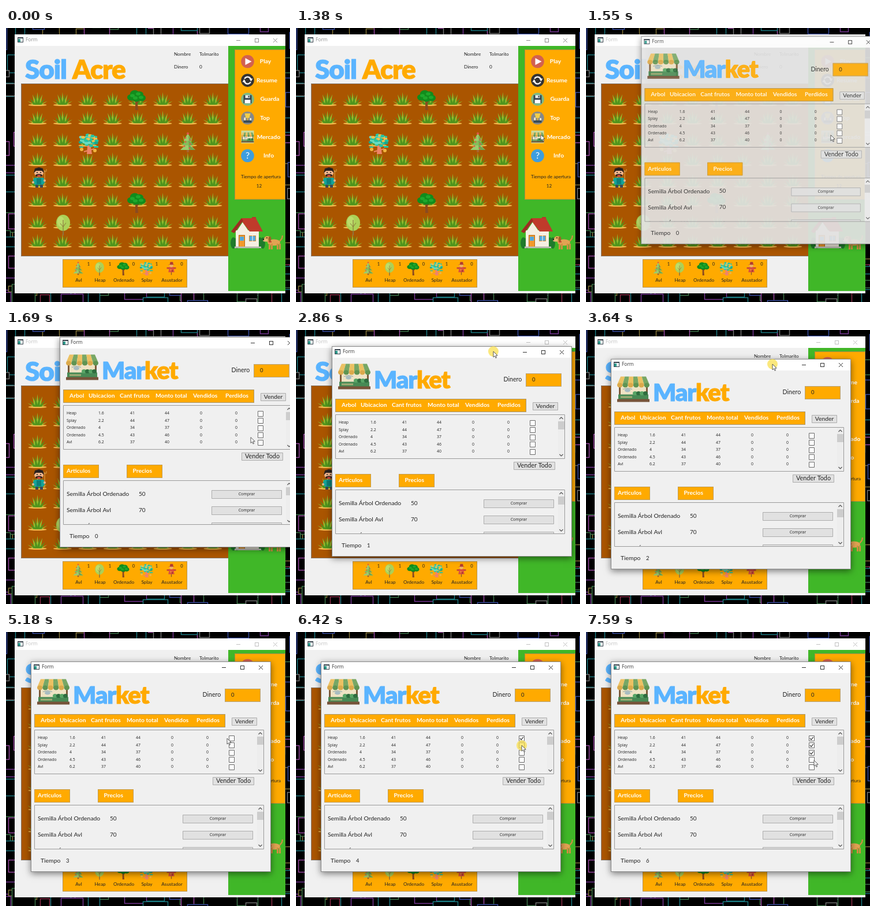
Write an HTML page with a canvas that moves like this. It is 492 by 474 pixels and loops after 8 s.

```html
<!DOCTYPE html>
<html lang="es">
<head>
<meta charset="utf-8">
<title>Form</title>
<style>
html, body { margin: 0; width: 100%; height: 100%; overflow: hidden; background: #000; }
canvas { display: block; width: 492px; height: 474px; }
</style>
</head>
<body>
<canvas id="stage"></canvas>
<script>
const W = 492, H = 474, LOOP = 8000;
const ORANGE = '#ffaa00', BLUE = '#5ab4ff', GRAY = '#f0f0f0';
const HAND = 'Lato, sans-serif', UI = '"Open Sans", sans-serif';
const dpr = window.devicePixelRatio || 1;

function setup(canvas) {
  canvas.width = W * dpr;
  canvas.height = H * dpr;
  const ctx = canvas.getContext('2d');
  ctx.scale(dpr, dpr);
  return ctx;
}
const screenCtx = setup(document.getElementById('stage'));
const desk = document.createElement('canvas');
let c = setup(desk);

// ---- drawing helpers ----
function rect(color, x, y, w, h) { c.fillStyle = color; c.fillRect(x, y, w, h); }
function frame(color, x, y, w, h) {
  c.strokeStyle = color; c.lineWidth = 1;
  c.strokeRect(x + .5, y + .5, w - 1, h - 1);
}
function box(fill, edge, x, y, w, h) { rect(fill, x, y, w, h); frame(edge, x, y, w, h); }
function oval(color, x, y, rx, ry = rx) {
  c.fillStyle = color;
  c.beginPath(); c.ellipse(x, y, rx, ry, 0, 0, 7); c.fill();
}
function path(p) {
  c.beginPath();
  for (let i = 0; i < p.length; i += 2) c.lineTo(p[i], p[i + 1]);
}
function poly(color, ...p) { path(p); c.fillStyle = color; c.fill(); }
function line(color, width, ...p) {
  path(p); c.strokeStyle = color; c.lineWidth = width; c.stroke();
}
function text(s, x, y, size, { font = HAND, color = '#222', weight = 400, align = 'left' } = {}) {
  c.font = `${weight} ${size}px ${font}`;
  c.fillStyle = color; c.textAlign = align; c.textBaseline = 'middle';
  c.fillText(s, x, y);
}
function heading(s, x, y, size, color) {
  c.font = `900 ${size}px ${HAND}`;
  c.letterSpacing = '-1.2px';
  c.textAlign = 'left'; c.textBaseline = 'alphabetic';
  c.fillStyle = c.strokeStyle = color; c.lineWidth = 1; c.lineJoin = 'round';
  c.fillText(s, x, y); c.strokeText(s, x, y);
  const w = c.measureText(s).width;
  c.letterSpacing = '0px';
  return x + w;
}
function at(x, y, scale, draw) {
  c.save(); c.translate(x, y); c.scale(scale, scale); draw(); c.restore();
}
function seeded(seed) {
  return () => (seed = (seed * 16807) % 2147483647) / 2147483647;
}

// ---- pictures, each around its own centre ----
function grass() {
  oval('#f3b94c', 0, 10.3, 16, 1.8);
  for (const k of [-4, 4, -2, 2, 0, -3, 3, -1, 1]) {
    const tipY = -12 + k * k * .95 + (k % 2 ? 2 : 0);
    poly(k % 2 ? '#4f941d' : '#93bd30', k * 1.5 - 2.6, 9.5, k * 4.3, tipY, k * 1.5 + 2.6, 9.5);
  }
}
function pine() {
  rect('#a9642f', -2, 10, 4, 7);
  for (let i = 2; i >= 0; i--) {
    const y = -16 + i * 8, w = 7 + i * 3;
    poly(i % 2 ? '#86bd5c' : '#9dcb6c', 0, y, w, y + 13, -w, y + 13);
    poly('#6fa74e', 1, y + 4, w, y + 13, 2, y + 13);
  }
  for (let i = 0; i < 6; i++) oval('#e0584a', (i % 2 ? 4 : -4) + (i > 3 ? i - 6 : 0), -8 + i * 3.6, 1.4);
  oval('#e0584a', 0, -15.5, 2);
}
function heap() {
  rect('#9a6b3c', -1, -2, 2, 21);
  oval('#acd057', 0, -3, 12, 14);
  oval('#bcdc6c', -4, -5, 6, 9);
  line('#8a7a3c', 1.2, 0, 18, 0, -8);
  line('#8a7a3c', 1, -5, -2, 0, 4, 5, -3);
}
function oak() {
  poly('#8a4b20', -2, 18, -2, 4, -9, -1, 0, 2, 8, -2, 2, 6, 3, 18);
  for (const [x, y, r] of [[-9, -4, 7], [9, -3, 7], [-3, -10, 8], [5, -9, 7], [0, -2, 7]])
    oval('#118c1c', x, y, r, r * .8);
  for (const [x, y] of [[-7, -7], [3, -10], [8, -4], [-2, -3]]) oval('#1fa82c', x, y, 4, 2.8);
}
function splay() {
  poly('#ef8468', -3, 18, -2, 6, -8, 0, 0, 3, 9, -1, 4, 7, 6, 18);
  const rnd = seeded(77), tones = ['#25c3a4', '#25c3a4', '#69dcc0', '#f2c14e', '#1aa78c'];
  for (let i = 0; i < 34; i++) {
    const a = i * 2.4, r = Math.sqrt(rnd());
    oval(tones[i % 5], Math.cos(a) * r * 15, -6 + Math.sin(a) * r * 10, 3.4, 2.4);
  }
  oval('#f2b53d', -12, 10, 3); oval('#f2b53d', 11, 12, 3);
  rect('#25c3a4', -16, 5, 7, 2); rect('#25c3a4', 9, 4, 8, 3);
  line('#ef8468', 2, -8, 14, 10, 9);
}
function farmer() {
  line('#d59b45', 1.2, 10, 16, 10, -13);
  line('#d59b45', 1, 7, -15, 7, -11, 13, -11, 13, -15);
  rect('#3a4a58', -6, 9, 5, 8); rect('#3a4a58', 2, 9, 5, 8);
  oval('#f0b58c', 0, -9, 8, 8);
  poly('#2a211d', -9, -8, -7, -16, 0, -18, 7, -16, 9, -8, 5, -12, -5, -12);
  oval('#2a211d', 0, -4, 6, 2.6); oval('#d8433a', 0, -3.4, 3, 1.5);
  oval('#222', -3, -9, 1); oval('#222', 3, -9, 1);
  poly('#14a39a', -8, 0, 8, 0, 11, 7, 7, 12, -7, 12, -11, 7);
  rect('#0d7f79', -4, 1, 8, 10);
  oval('#f0b58c', -10, 8, 2); oval('#f0b58c', 10, 5, 2);
}
function scarecrow() {
  rect('#8c5a28', -1, 2, 2, 15);
  rect('#c7453a', -12, -3, 24, 4);
  poly('#d9503f', -5, -4, 5, -4, 8, 10, -8, 10);
  oval('#edb765', 0, -8, 5);
  poly('#b23b30', -9, -10, -4, -11, -3, -17, 4, -17, 5, -11, 9, -10);
  rect('#f0a43a', -3, 2, 3, 3); rect('#8f2f28', 1, 5, 3, 3);
}
function stall() {
  rect('#efe3c4', -24, -8, 48, 23);
  rect('#7d5a3a', -25, -6, 3, 24); rect('#7d5a3a', 22, -6, 3, 24);
  line('#8aa5ad', 1.2, -18, 0, -10, -2, -2, 0); oval('#a7bcc2', -10, 2, 5, 3);
  for (let i = 0; i < 6; i++) {
    const x = -28 + i * 9.33, tone = i % 2 ? '#78a765' : '#ecc163';
    poly(tone, -22 + i * 7.33, -22, -14.7 + i * 7.33, -22, x + 9.33, -8, x, -8);
    oval(i % 2 ? '#5f9452' : '#dba94b', x + 4.66, -7, 4.66, 4);
  }
  rect('#478a55', -26, 9, 52, 9);
  for (let i = 0; i < 4; i++) oval(i % 2 ? '#2f6d3f' : '#58a566', 3 + i * 6, 7, 4, 3.5);
  rect('#77543a', -28, 17, 56, 5);
  rect('#a3ad76', -22, 12, 20, 3);
}
function house() {
  for (const [x, w] of [[386 - 392, 0], [-24, 5], [-18, 5], [22, 5], [27, 4]])
    if (w) oval('#1f7a2b', x, 18, w, 10);
  rect('#b8352a', 8, -27, 7, 12);
  rect('#f6efe2', -20, -4, 40, 30);
  poly('#f6efe2', -18, -3, -8, -18, 2, -3);
  poly('#c03a2b', -28, -2, -10, -25, 15, -25, 27, -2, 4, -2, -9, -19, -22, 0);
  poly('#9e2c22', -28, -2, -10, -25, -7, -21, -23, 1);
  box('#f39a2b', '#b86a16', -15, 4, 11, 21);
  box('#53a9dd', '#e28d28', 3, 5, 12, 10);
  rect('#53a9dd', -13, 7, 7, 7);
  line('#fff', 1, 9, 5, 9, 15);
  rect('#b9b9b0', -22, 24, 46, 3);
}
function dog() {
  oval('#e2a353', 1, 1, 11, 5.5);
  for (const x of [-8, -4, 6, 10]) rect('#d08f42', x, 3, 3, 10);
  oval('#e2a353', -10, -5, 6, 5); oval('#e9ba78', -14, -3, 4, 2.6);
  oval('#9c6128', -6, -5, 2.4, 4.5);
  oval('#222', -17, -4, 1.2); oval('#222', -11, -7, .9);
  line('#d08f42', 2.2, 11, -1, 15, -6, 16, -11);
  rect('#c8452f', -8, -1, 5, 2);
}

// ---- menu icons ----
function playIcon() {
  oval('#d2614f', 0, 0, 11.3);
  poly('#fff', -4, -6, 7, 0, -4, 6);
}
function resumeIcon() {
  oval('#333', 0, 0, 11.3);
  c.strokeStyle = '#fff'; c.lineWidth = 2.4;
  for (const a of [.5, 3.64]) { c.beginPath(); c.arc(0, 0, 6, a, a + 2.3); c.stroke(); }
  poly('#fff', 3, -3, 9, -3, 6, 2); poly('#fff', -3, 3, -9, 3, -6, -2);
}
function saveIcon() {
  oval('#7db985', 0, 0, 11.3);
  rect('#37424c', -7, -7, 14, 14);
  rect('#e9eef0', -4, -7, 8, 5); rect('#fff', -5, 1, 10, 6);
  rect('#37424c', 1, -6, 2, 3);
}
function topIcon() {
  oval('#85898a', 0, 0, 11.3);
  poly('#f2cf4a', -5, -8, 5, -8, 3, 0, -3, 0);
  rect('#e2b535', -1, 0, 2, 4);
  rect('#394b55', -7, 4, 14, 4); rect('#f5f0df', -6, -1, 2.5, 5); rect('#f5f0df', 4, 0, 2.5, 4);
}
function marketIcon() {
  rect('#c9dba0', -11, -11, 22, 22);
  at(0, 1, .39, stall);
}
function infoIcon() {
  oval('#3f9ede', 0, 0, 11.3);
  text('?', 0, 0, 16, { color: '#fff', align: 'center' });
}

// ---- windows ----
function titleBar(x, y, w, ink) {
  rect('#fff', x, y, w, 20);
  box('#fff', '#39434d', x + 5, y + 5, 10, 9);
  rect('#39434d', x + 5, y + 5, 10, 2); rect('#2f9a8c', x + 6, y + 8, 4, 5);
  text('Form', x + 19, y + 10, 8.4, { font: UI, color: ink });
  const m = x + w - 85, my = y + 10;
  line(ink, 1, m, my + .5, m + 7, my + .5);
  frame(ink, m + 32, my - 3, 7, 7);
  line(ink, 1, m + 64, my - 3, m + 71, my + 4);
  line(ink, 1, m + 71, my - 3, m + 64, my + 4);
}

function wallpaper() {
  rect('#000', 0, 0, W, H);
  const rnd = seeded(4211);
  const tones = ['#7d3a9c', '#1c7f86', '#8f2f4c', '#3b4fa8', '#3f7a4c', '#777', '#a04aa8', '#8a7a3a'];
  for (let i = 0; i < 260; i++) {
    const x = rnd() * 530 - 30, y = rnd() * 510 - 30;
    const w = 12 + rnd() * 34, h = 10 + rnd() * 30;
    rect('#000', x, y, w, h);
    c.strokeStyle = tones[i % tones.length]; c.lineWidth = 1.4;
    c.strokeRect(Math.round(x) + .5, Math.round(y) + .5, Math.round(w), Math.round(h));
  }
}

function farmWindow() {
  rect(GRAY, 15, 11, 469, 448);
  titleBar(15, 11, 469, '#8c8c8c');
  heading('Soil', 33, 88, 46, BLUE);
  heading('Acre', 115, 88, 46, ORANGE);
  text('Nombre', 291, 46, 8.2); text('Tolmarito', 335, 46, 8.2);
  text('Dinero', 291, 68, 8.2); text('0', 335, 68, 8.2);

  box('#aa5500', '#85776a', 26, 96, 360, 299);
  for (const y of [123, 155, 193, 227, 264, 297, 335, 368])
    for (let i = 0; i < 8; i++) at(54.5 + i * 43.4, y, 1, grass);
  at(226, 124, 1, oak); at(226, 302, 1, oak);
  at(143, 200, 1, splay); at(315, 198, 1, pine);
  at(99, 340, 1, heap); at(57, 259, 1, farmer);

  rect('#40b728', 385, 31, 99, 424);
  box(ORANGE, '#a88b4a', 396, 37, 88, 260);
  const menu = [['Play', 449.5, playIcon], ['Resume', 452, resumeIcon], ['Guarda', 457, saveIcon],
    ['Top', 448.5, topIcon], ['Mercado', 455, marketIcon], ['Info', 455, infoIcon]];
  menu.forEach(([label, x, icon], i) => {
    const y = 58 + i * 32.6;
    at(418.5, y, 1, icon);
    text(label, x, y, 10.3, { color: '#fff', weight: 700, align: 'center' });
  });
  text('Tiempo de apertura', 441.5, 258, 8, { align: 'center' });
  text('12', 438.5, 274, 8, { align: 'center' });
  at(418, 354, 1, house); at(463, 370, 1, dog);

  box(ORANGE, '#b9924a', 98, 400, 216, 49);
  const stock = [['Avl', 126, 1, pine], ['Heap', 163, 1, heap], ['Ordenado', 204, 0, oak],
    ['Splay', 244, 1, splay], ['Asustador', 287.5, 0, scarecrow]];
  stock.forEach(([label, x, n, icon]) => {
    at(x - 1, 416, .66, icon);
    text(n, x + 17, 409, 7.5, { align: 'center' });
    text(label, x, 436.5, 8.2, { align: 'center' });
  });
}

function button(label, x, y, w, h, size, font) {
  box('#e1e1e1', '#adadad', x, y, w, h);
  text(label, x + w / 2, y + h / 2, size, { font, align: 'center' });
}
function scrollBox(y, h) {
  frame('#9a9a9a', 6, y, 398, h);
  rect('#ededed', 392, y + 1, 11, h - 2);
  rect('#cdcdcd', 392, y + 12, 11, 14);
  line('#555', 1.1, 394.5, y + 8, 397.5, y + 5, 400.5, y + 8);
  line('#555', 1.1, 394.5, y + h - 8, 397.5, y + h - 5, 400.5, y + h - 8);
}

const HEAD = { color: '#fff', weight: 700 };
const TREES = ['Heap 1.6 41 44', 'Splay 2.2 44 47', 'Ordenado 4 34 37', 'Ordenado 4.5 43 46', 'Avl 6.2 37 40'];

function marketWindow(checked, seconds) {
  c.save();
  c.shadowColor = 'rgba(0,0,0,.5)'; c.shadowBlur = 11 * dpr; c.shadowOffsetY = 3 * dpr;
  rect(GRAY, 0, 0, 416, 364);
  c.restore();
  titleBar(0, 0, 416, '#333');
  frame('#8a8a8a', 0, 0, 416, 364);
  at(39, 52.5, 1, stall);
  heading('ket', heading('Mar', 73, 72.5, 42, BLUE), 72.5, 42, ORANGE);
  text('Dinero', 297.5, 58, 10.6);
  box(ORANGE, '#b5a27c', 336, 47, 62, 23);
  text('0', 347, 58.5, 9.5);

  box(ORANGE, '#a89468', 6, 91, 331, 23);
  const heads = [['Arbol', 17], ['Ubicacion', 50], ['Cant frutos', 104], ['Monto total', 166],
    ['Vendidos', 231], ['Perdidos', 287]];
  for (const [s, x] of heads) text(s, x, 102, 10.3, HEAD);
  button('Vender', 348, 97, 44, 14, 10.3);

  scrollBox(118, 77);
  const cols = [12, 67, 122, 182, 243, 304];
  TREES.forEach((row, i) => {
    const y = 132.5 + i * 12.5, top = Math.round(y - 5);
    `${row} 0 0`.split(' ').forEach((s, k) => text(s, cols[k], y, 6.9, { font: UI }));
    box('#fff', '#6a6a6a', 343, top, 10, 10);
    if (i < checked) line('#222', 1.1, 345, top + 5, 347.2, top + 7.3, 351, top + 2.5);
  });
  button('Vender Todo', 315, 200, 72, 14, 10.8);

  box(ORANGE, '#c29c50', 6, 221, 62, 23);
  text('Articulos', 12, 232, 10.3, HEAD);
  box(ORANGE, '#c29c50', 116, 221, 62, 23);
  text('Precios', 126.5, 232, 10.3, HEAD);

  c.save();
  c.beginPath(); c.rect(6, 248, 398, 76); c.clip();
  [['Ordenado', 50], ['Avl', 70], ['Heap', 60]].forEach(([kind, price], i) => {
    const y = 271.5 + i * 28.3;
    text('Semilla Árbol ' + kind, 12, y, 10.4);
    text(price, 137, y, 10);
    button('Comprar', 263, Math.round(y - 7), 122, 15, 6.9, UI);
  });
  c.restore();
  scrollBox(248, 77);
  text('Tiempo', 17, 345, 10.4);
  text(seconds, 61, 345, 9.5);
}

function pointer(x, y) {
  path([x, y, x, y + 10, x + 2.4, y + 7.8, x + 4, y + 11.4, x + 5.6, y + 10.7, x + 4.1, y + 7.2, x + 7.2, y + 7]);
  c.closePath();
  c.fillStyle = '#fff'; c.fill();
  c.strokeStyle = '#333'; c.lineWidth = .8; c.stroke();
}

// ---- motion ----
const MOUSE = [[70, 431, 438], [680, 414, 157], [840, 414, 157], [910, 423, 173], [1080, 424, 184],
  [1920, 424, 186], [2500, 373, 21], [2600, 373, 21], [2700, 366, 27], [2860, 342, 37],
  [3100, 323, 57], [3240, 323, 57], [3640, 323, 59], [3790, 323, 60], [4170, 323, 60],
  [4950, 375, 184], [5030, 375, 184], [5180, 383, 184], [5410, 383, 184], [5490, 385, 184],
  [5870, 385, 184], [6350, 391, 196], [6740, 391, 197], [7000, 391, 209], [7120, 391, 209], [7430, 395, 222]];
const PRESSES = [[1080, 1250], [2540, 3790], [5730, 5870], [6350, 6480], [7000, 7120]];
const CHECKS = [5870, 6480, 7120];
const OPEN = 1460;

function mouse(t) {
  const i = MOUSE.findIndex(k => k[0] > t);
  if (i < 0) return MOUSE[MOUSE.length - 1].slice(1);
  const [t0, x0, y0] = MOUSE[Math.max(0, i - 1)], [t1, x1, y1] = MOUSE[i];
  let p = t1 > t0 ? (t - t0) / (t1 - t0) : 0;
  if (t1 - t0 > 450) p = p * p * (3 - 2 * p);
  return [x0 + (x1 - x0) * p, y0 + (y1 - y0) * p];
}

function draw(t) {
  c.drawImage(desk, 0, 0, W, H);
  const [mx, my] = mouse(t);
  if (t >= OPEN) {
    rect('rgba(255,255,255,.45)', 30, 12, 440, 18);
    const drag = mouse(Math.min(3790, Math.max(2600, t)));
    const p = 1 - (1 - Math.min(1, (t - OPEN) / 180)) ** 3, s = .9 + .1 * p;
    c.save();
    c.globalAlpha = p;
    c.translate(Math.round(drag[0] - 280) + 208 * (1 - s), Math.round(drag[1] - 9) + 182 * (1 - s));
    c.scale(s, s);
    marketWindow(CHECKS.filter(k => t >= k).length, Math.max(0, Math.floor((t - 1430) / 1000)));
    c.restore();
  }
  if (PRESSES.some(([a, b]) => t >= a && t < b)) oval('rgba(250,222,70,.7)', mx, my, 9);
  if (t >= 70) pointer(mx, my);
}

wallpaper();
farmWindow();
c = screenCtx;
const start = performance.now();
function tick() {
  draw((performance.now() - start) % LOOP);
  requestAnimationFrame(tick);
}
tick();
</script>
</body>
</html>
```
